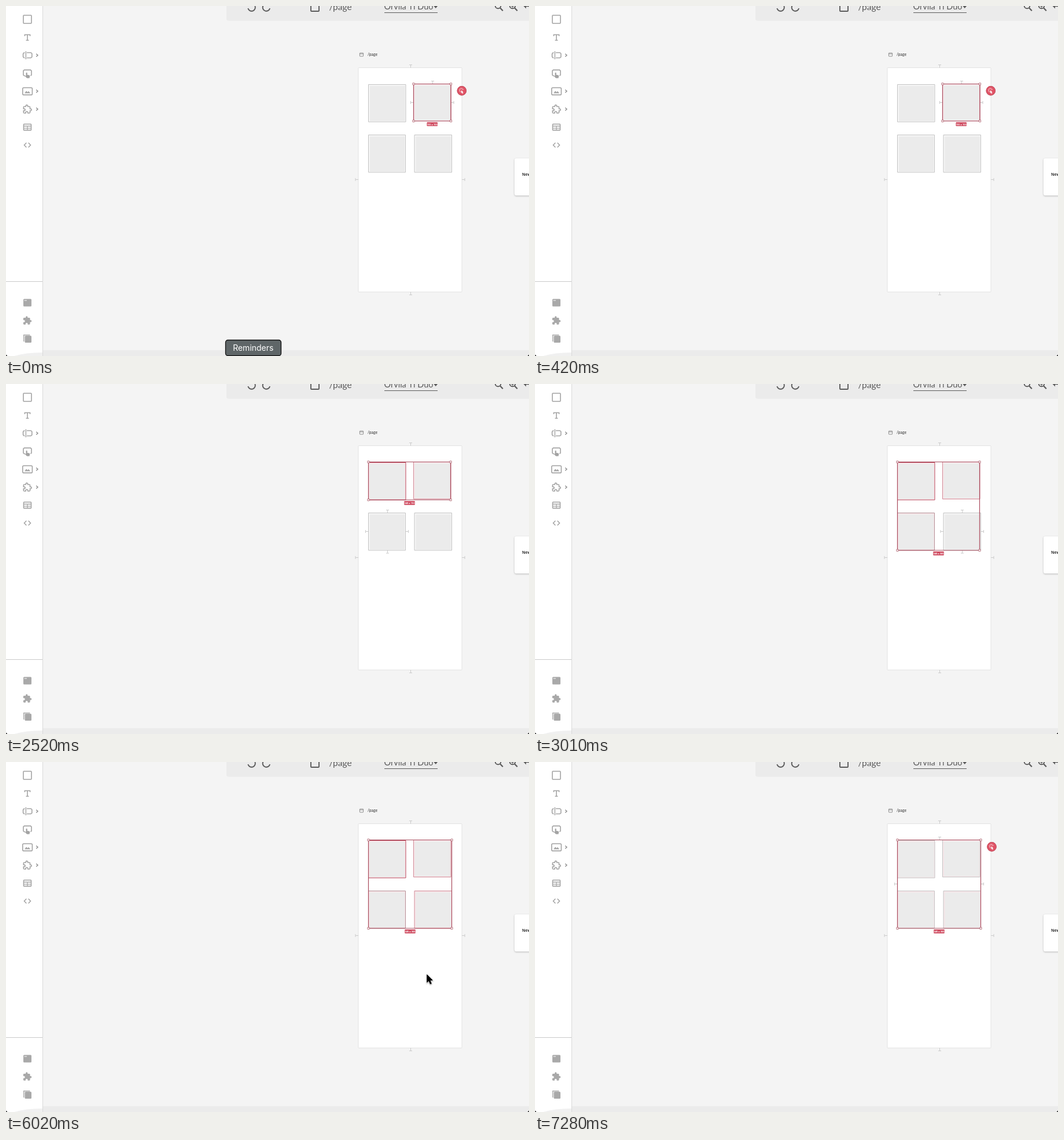
Recreate the animation shown at these times as an HTML page with a canvas. Size 904x604 px, loop 8000 ms.

```html
<!DOCTYPE html>
<html lang="en">
<head>
<meta charset="utf-8">
<title>Page editor</title>
<style>
html, body { margin: 0; width: 100%; height: 100%; overflow: hidden; background: #f4f4f4; }
canvas { display: block; width: 904px; height: 604px; }
</style>
</head>
<body>
<canvas id="stage" width="904" height="604"></canvas>
<script>
const ctx = document.getElementById('stage').getContext('2d');
const LOOP = 8000;
const GREY = '#a3a3a3', DARK = '#5b5b5b', RED = '#a84a5c', PINK = '#d08a96';

const squares = [
  { x: 626.5, y: 135.5, w: 64.5, h: 64.5 },
  { x: 704.5, y: 134.5, w: 64.5, h: 64 },
  { x: 626.5, y: 222.5, w: 64, h: 64.5 },
  { x: 706, y: 222.5, w: 64.5, h: 64.5 }
];

const puzzle = new Path2D('M20.5 11H19V7c0-1.1-.9-2-2-2h-4V3.5a2.5 2.5 0 0 0-5 0V5H4' +
  'c-1.1 0-2 .9-2 2v3.8h1.5a2.7 2.7 0 0 1 0 5.4H2V20c0 1.1.9 2 2 2h3.8v-1.5' +
  'a2.7 2.7 0 0 1 5.4 0V22H17c1.1 0 2-.9 2-2v-4h1.5a2.5 2.5 0 0 0 0-5z');
const hand = new Path2D('M34.5 115.2q1.4-1.2 2.3.2v3.4l3.6.8q1 .3.8 1.4l-.7 3.6h-4.4' +
  'l-3.3-3.5 .9-.9 .8.4z');
const arrow = new Path2D('M0 0V14.3L3.3 11.2L5.7 16.7L8.1 15.7L5.7 10.3H10.2Z');

function box(x, y, w, h, r, fill, stroke, lw = 1) {
  ctx.beginPath();
  ctx.roundRect(x, y, w, h, r);
  if (fill) { ctx.fillStyle = fill; ctx.fill(); }
  if (stroke) { ctx.strokeStyle = stroke; ctx.lineWidth = lw; ctx.stroke(); }
}

function line(points, color, lw = 1) {
  ctx.beginPath();
  for (let i = 0; i < points.length; i += 2) ctx.lineTo(points[i], points[i + 1]);
  ctx.strokeStyle = color;
  ctx.lineWidth = lw;
  ctx.stroke();
}

function poly(points, color) {
  ctx.beginPath();
  for (let i = 0; i < points.length; i += 2) ctx.lineTo(points[i], points[i + 1]);
  ctx.fillStyle = color;
  ctx.fill();
}

function ring(x, y, r, color, lw, from = 0, to = 7) {
  ctx.beginPath();
  ctx.arc(x, y, r, from, to);
  ctx.strokeStyle = color;
  ctx.lineWidth = lw;
  ctx.stroke();
}

function text(str, x, y, font, color, align = 'left') {
  ctx.font = font;
  ctx.textAlign = align;
  ctx.fillStyle = color;
  ctx.fillText(str, x, y);
}

function shape(path, x, y, scale, fill, stroke) {
  ctx.save();
  ctx.translate(x, y);
  ctx.scale(scale, scale);
  if (stroke) { ctx.strokeStyle = stroke; ctx.lineWidth = 1.6 / scale; ctx.stroke(path); }
  if (fill) { ctx.fillStyle = fill; ctx.fill(path); }
  ctx.restore();
}

// Margin marks on the sides named in `sides`
function ticks(r, sides = 'tblr', alpha = 1) {
  if (alpha <= 0) return;
  const cx = Math.round(r.x + r.w / 2) + .5, cy = Math.round(r.y + r.h / 2) - .5;
  const bottom = r.y + r.h, right = r.x + r.w, c = '#cbcbcb';
  ctx.globalAlpha = alpha;
  const mark = (x, y, dx, dy) => {
    line([x, y, x + dx * 5, y + dy * 5], c);
    const ex = x + dx * 5, ey = y + dy * 5;
    line([ex - dy * 2.5, ey - dx * 2.5, ex + dy * 2.5, ey + dx * 2.5], c);
  };
  if (sides.includes('t')) mark(cx, r.y, 0, -1);
  if (sides.includes('b')) mark(cx, bottom, 0, 1);
  if (sides.includes('l')) mark(r.x, cy, -1, 0);
  if (sides.includes('r')) mark(right, cy, 1, 0);
  ctx.globalAlpha = 1;
}

function sidebar() {
  box(0, 0, 63, 604, 0, '#fff');
  line([63.5, 0, 63.5, 604], '#d9d9d9');
  line([0, 475.5, 63, 475.5], '#c9c9c9');
  ctx.beginPath();
  ctx.moveTo(14, 604);
  ctx.quadraticCurveTo(34, 598, 63, 598);
  ctx.lineTo(63, 604);
  ctx.fillStyle = '#f0f0f0';
  ctx.fill();

  box(30, 16, 14, 14, 1, null, GREY, 1.6);
  line([32.4, 52, 32.4, 49.5, 41.6, 49.5, 41.6, 52], GREY, 1.5);
  line([37, 49.5, 37, 59], GREY, 1.6);
  line([34.5, 59.2, 39.5, 59.2], GREY, 1.4);

  line([34.4, 78, 34.4, 92], GREY, 1.4);
  line([36, 80.5, 43, 80.5, 44.8, 82, 44.8, 88, 43, 89.5, 36, 89.5], GREY, 1.6);
  line([32.5, 80.5, 31, 80.8, 29.6, 82.5, 29.6, 87.5, 31, 89.2, 32.5, 89.5], GREY, 1.6);

  line([33, 120.5, 31.5, 120.5, 30, 119, 30, 111.8, 31.5, 110.4, 42.5, 110.4,
    44, 111.8, 44, 119, 42.5, 120.5], GREY, 1.6);
  shape(hand, 0, 0, 1, GREY);

  box(28.8, 141, 16.6, 12.4, 2, null, GREY, 1.6);
  poly([32, 150.5, 35.2, 146.5, 37, 148.8, 39, 147, 42.2, 150.5], GREY);
  shape(puzzle, 29, 170.2, .66, null, GREY);

  box(30.5, 203.8, 13, 10.6, 1, null, GREY, 1.6);
  line([30.5, 207.3, 43.5, 207.3], GREY, 1.4);
  line([30.5, 210.9, 43.5, 210.9], GREY, 1.2);
  line([37, 207.3, 37, 214.4], GREY, 1.2);

  line([35.3, 236, 31.5, 240, 35.3, 244], GREY, 1.5);
  line([38.7, 236, 42.5, 240, 38.7, 244], GREY, 1.5);
  for (const y of [85, 147, 178]) line([52.3, y - 2.6, 55, y, 52.3, y + 2.6], '#8c8c8c', 1.4);

  box(30, 505.5, 14, 13, 1.5, '#a9a9a9');
  line([31.5, 508.2, 36, 508.2], '#fff', .9);
  shape(puzzle, 28.5, 534.5, .69, '#a9a9a9');
  box(32.5, 569, 11.5, 12, 1.5, '#a9a9a9');
  line([30.7, 579, 30.7, 567.8, 41.5, 567.8], '#a9a9a9', 1.4);
}

function toolbar() {
  box(381, -8, 540, 33.5, 4, '#ebebeb');
  ring(424.5, 2.5, 6.3, DARK, 1.9, -.4, 2.9);
  ring(450, 2.5, 6.3, DARK, 1.9, .25, 3.6);
  box(527, -7, 14, 16, 1, null, DARK, 1.9);
  text('/page', 558.5, 7, '15.5px Lato, sans-serif', DARK);
  text('Orvila Ti Duo', 653.5, 6.3, '14.5px Lato, sans-serif', DARK);
  line([654, 11.5, 746, 11.5], DARK, 1.1);
  poly([739, -.5, 746.5, -.5, 742.7, 4], DARK);
  for (const x of [850.5, 875.5]) {
    ring(x, -.5, 4.8, DARK, 1.9);
    line([x + 3.3, 3, x + 8.3, 8.3], DARK, 2.2);
  }
  line([873, .2, 878, .2], DARK, 1.2);
  line([875.5, -2, 875.5, 2.7], DARK, 1.2);
  poly([894.5, 0, 899, -4, 899, 4.5], DARK);
  line([898, .2, 904, .2], DARK, 2);
}

function scene() {
  box(0, 0, 904, 604, 0, '#f4f4f4');
  box(64, 594, 840, 10, 0, '#ebebeb');
  sidebar();
  toolbar();

  box(611.4, 81, 6.2, 5.8, .6, null, '#777', .8);
  line([611.4, 82.7, 617.6, 82.7], '#777', .8);
  text('/page', 625, 86.2, '500 6.7px Lato, sans-serif', '#333');
  const page = { x: 609, y: 106.5, w: 179, h: 387 };
  box(page.x, page.y, page.w, page.h, 1, '#fff', '#e3e3e3');
  ticks(page);

  ctx.save();
  ctx.shadowColor = 'rgba(0,0,0,.25)';
  ctx.shadowBlur = 3;
  ctx.shadowOffsetY = 1;
  box(879, 263, 40, 64, 3, '#fff');
  ctx.restore();
  text('New', 892, 293, 'bold 6.8px "Noto Sans", sans-serif', '#333');

  poly([0, 601.5, 0, 604, 2.5, 604], '#222');
  poly([904, 601.5, 904, 604, 901.5, 604], '#222');
}

function square(r, edge, tint) {
  box(r.x, r.y, r.w, r.h, 0, tint ? '#f6e6e9' : '#f6f6f6');
  box(r.x + 2.5, r.y + 2.5, r.w - 4, r.h - 4, 0, '#ebebeb');
  box(r.x, r.y, r.w, r.h, 0, null, edge);
}

function selection(r, label) {
  const right = r.x + r.w, bottom = r.y + r.h;
  box(r.x, r.y, r.w, r.h, 0, null, RED, 1.2);
  for (const x of [r.x, right])
    for (const y of [r.y, bottom]) box(x - 1.6, y - 1.6, 3.2, 3.2, 0, '#fff', '#b56b78', .9);
  const cx = r.x + r.w / 2;
  box(cx - 9.3, bottom + 2, 18.6, 6.8, 1, '#cf4b60');
  text(label, cx, bottom + 7, 'bold 4px "Open Sans", sans-serif', '#fff', 'center');
}

function actionButton(x, y) {
  ctx.beginPath();
  ctx.arc(x, y, 8.2, 0, 7);
  ctx.fillStyle = '#e05265';
  ctx.fill();
  ring(x, y, 7.8, '#bd5261', .9);
  shape(arrow, x - .8, y - 1, .38, '#fff');
  for (let i = 0; i < 7; i++) {
    const a = 2 + i * .65, c = Math.cos(a), s = Math.sin(a);
    line([x - .8 + c * 2, y - 1 + s * 2, x - .8 + c * 4.2, y - 1 + s * 4.2], '#fff', .8);
  }
}

function tooltip(alpha) {
  if (alpha <= 0) return;
  ctx.globalAlpha = alpha;
  poly([420, 604, 423, 602.5, 434, 602.5, 437, 604], '#aaa');
  box(379.5, 576.5, 96, 27, 4, '#5f6668', '#111', 1.3);
  text('Reminders', 427.3, 594.7, '14px Inter, sans-serif', '#fff', 'center');
  ctx.globalAlpha = 1;
}

function pointer(t) {
  if (t < 6020 || t >= 7280) return;
  ctx.save();
  if (t >= 7210) ctx.globalAlpha = .5;
  ctx.shadowColor = 'rgba(0,0,0,.3)';
  ctx.shadowBlur = 2;
  ctx.shadowOffsetY = 1;
  shape(arrow, 727.5, 366.5, 1, '#000', '#fff');
  ctx.restore();
  ctx.save();
  if (t >= 7210) ctx.globalAlpha = .5;
  shape(arrow, 727.5, 366.5, 1, '#000');
  ctx.restore();
}

// Opacity that changes in 70 ms steps
const stepped = (t, start, count) =>
  Math.min(1, Math.max(0, Math.floor((t - start) / 70 + 1) / count));

function hoverMarks(t) {
  const [a, b, c, d] = squares;
  if (t < 1540) ticks(b, 'tlr');
  else if (t < 2240) ticks(a, 'tlr');
  if (t >= 1820 && t < 2520) ticks(b, 'tlrb', stepped(t, 1820, 2));
  if (t >= 2520 && t < 3010) ticks(c);
  if ((t >= 3010 && t < 3570) || t >= 4410) ticks(d, 'tblr', 1 - stepped(t, 5110, 3));
}

function draw(t) {
  scene();
  const grouped = t >= 6650;
  const count = t < 1540 ? 1 : t < 2730 ? 2 : t < 4760 ? 3 : 4;
  const area = count === 1 ? squares[1]
    : { x: 626.5, y: 134.5, w: count === 4 ? 144 : 142, h: count === 2 ? 65.5 : 152.5 };

  if (grouped) ticks(area, 'tlr');
  else hoverMarks(t);

  if (!grouped || t >= 6790) {
    squares.forEach((r, i) => {
      const picked = count === 1 ? i === 1 : i < count;
      const edge = !picked || grouped ? '#c3c3c3' : i === 0 ? '#b9495c' : i === 2 ? '#b39096' : PINK;
      square(r, edge, picked);
    });
  }

  const label = ['155 x 155', '340 x 153', '340 x 365', '345 x 365'][count - 1];
  selection(area, label);
  if (count === 1) actionButton(787.8, 146.3);
  if (grouped) actionButton(789.5, 146.3);
  tooltip(1 - stepped(t, 70, 6));
  pointer(t);
}

function tick() {
  draw(performance.now() % LOOP);
  requestAnimationFrame(tick);
}
tick();
</script>
</body>
</html>
```
